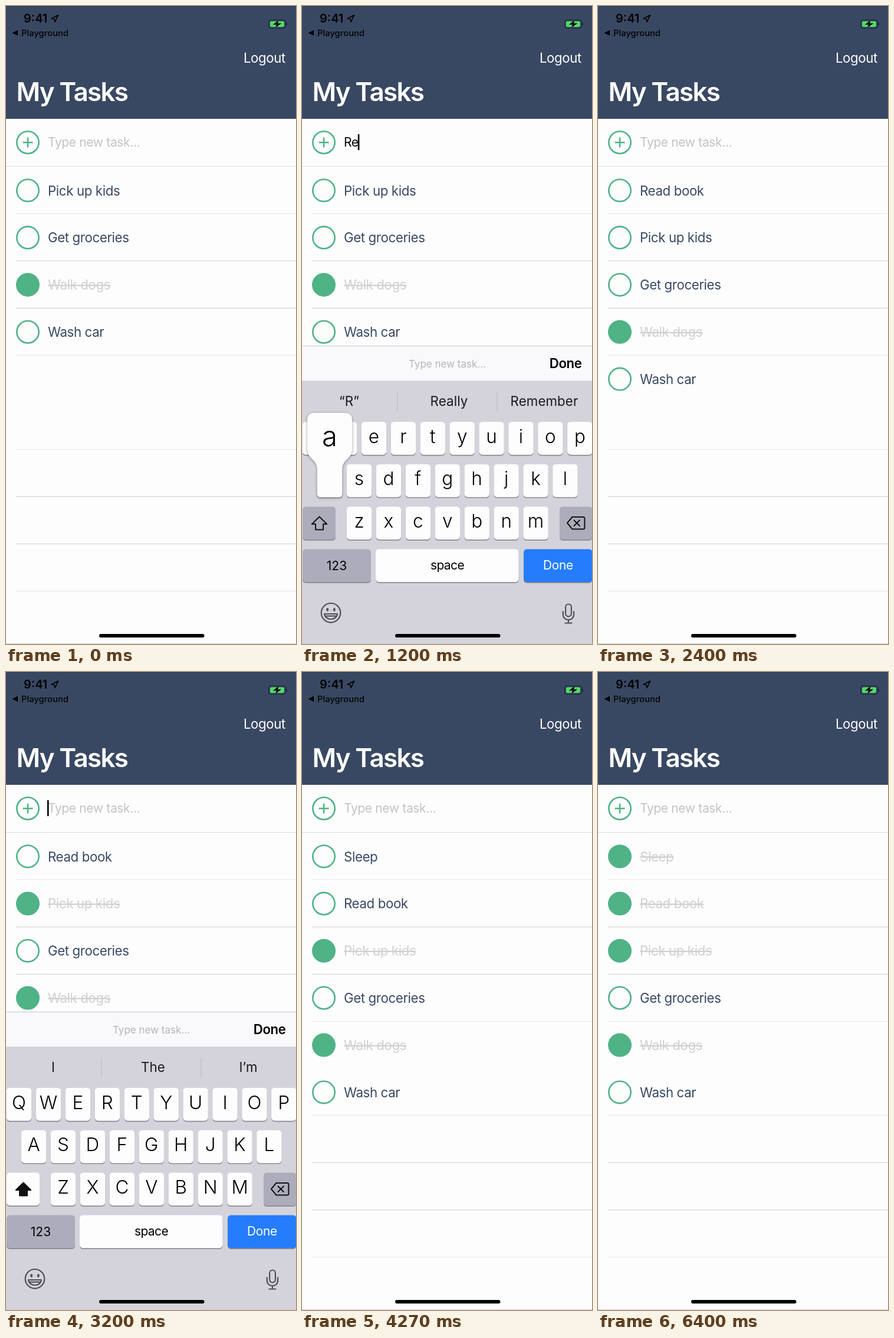
Animation of 492 by 1080 pixels, one loop 6.47 s. Source, as an HTML page:

```html
<!DOCTYPE html>
<html lang="en">
<head>
<meta charset="utf-8">
<title>My Tasks</title>
<style>
  html, body { margin: 0; width: 100%; height: 100%; overflow: hidden; background: #fdfdfd; }
  svg { display: block; width: 492px; height: 1080px; font-family: Inter, Roboto, sans-serif; }
  text { white-space: pre; }
  .body { font-size: 22.3px; letter-spacing: -.4px; }
  .field { font-size: 21px; letter-spacing: -.35px; }
  .hint { font-size: 22.3px; letter-spacing: .1px; text-anchor: middle; fill: #1a1a1c; }
  .mid { text-anchor: middle; }
  .end { text-anchor: end; }
</style>
</head>
<body>
<svg id="stage" viewBox="0 0 492 1080"></svg>
<script>
const LOOP = 6470;
const GREEN = '#4fb386', NAVY = '#394862', PALE = '#d0d0d4';
const ROWS = ['qwertyuiop', 'asdfghjkl', 'zxcvbnm'];
const ROW_X = [22, 47, 97], ROW_Y = [704, 775.7, 847.5];

// key, pressed from, pressed until, text once released
const presses = [
  ['r', 1000, 1065, 'R'], ['e', 1080, 1140, 'Re'], ['a', 1170, 1260, 'Rea'],
  ['d', 1330, 1395, 'Read'], [' ', 1460, 1525, 'Read '], ['b', 1560, 1620, 'Read b'],
  ['o', 1630, 1690, 'Read bo'], ['o', 1700, 1790, 'Read boo'],
  ['k', 1860, 1925, 'Read book'], ['done', 1990, 2060, ''],
  ['s', 3270, 3335, 'S'], ['l', 3400, 3465, 'Sl'], ['e', 3570, 3635, 'Sle'],
  ['e', 3700, 3765, 'Slee'], ['p', 3830, 3895, 'Sleep'], ['done', 3970, 4040, '']
];

// typed text -> three suggestions and whether the middle one is marked
const hints = {
  '': ['I', 'The', 'I’m'],
  'R': ['“R”', 'Really', 'Remember'],
  'Re': ['“R”', 'Really', 'Remember'],
  'Rea': ['“Rea”', 'Read', 'Ready'],
  'Read': ['“Read”', 'Reading', 'Ready'],
  'Read ': ['the', 'it', 'this'],
  'Read b': ['“b”', 'by', 'but'],
  'Read bo': ['“bo”', 'fo', 'book', true],
  'Read boo': ['“boo”', 'book', 'books', true],
  'Read book': ['book', 'books', 'booking'],
  'S': ['“S”', 'So', 'She'],
  'Sl': ['“s', 'I’', 'Ho', true],
  'Sle': ['“Sle”', 'Sleep', 'Sleeping'],
  'Slee': ['“Slee”', 'Sleep', 'Sleeping', true],
  'Sleep': ['Sleep', 'Sleeping', 'Sleepy']
};

// label, added at, ticked at; newest first
const tasks = [
  ['Sleep', 4040, 4870], ['Read book', 2060, 5270], ['Pick up kids', 0, 2670],
  ['Get groceries', 0, LOOP], ['Walk dogs', 0, 0], ['Wash car', 0, LOOP]
];

// keyboard: rise start and end, fall start and end
const shows = [[740, 980, 2065, 2310], [2880, 3120, 4045, 4260]];

const rect = (x, y, w, h, fill, r = 0) =>
  `<rect x="${x}" y="${y}" width="${w}" height="${h}" rx="${r}" fill="${fill}"/>`;
const text = (x, y, str, cls = 'body', attrs = '') =>
  `<text x="${x}" y="${y}" class="${cls}" ${attrs}>${str}</text>`;
const path = (d, attrs) => `<path d="${d}" ${attrs}/>`;
const key = (x, y, w, fill) =>
  rect(x, y + 1.4, w, 56, '#8c8a92', 5.5) + rect(x, y, w, 55.7, fill, 5.5);
const ring = (y, full) =>
  `<circle cx="37" cy="${y}" r="18.7" fill="${full ? GREEN : 'none'}" stroke="${GREEN}" stroke-width="2.6"/>`;

function header() {
  return rect(0, 0, 492, 191, NAVY) + rect(0, 0, 492, 1, '#2c3850') +
    text(30, 27.7, '9:41', '', 'font-size="20" font-weight="600"') +
    path('M77 21.2L88.6 15.3L83 27L82.1 21.8Z',
      'fill="none" stroke="#000" stroke-width="1.6" stroke-linejoin="round"') +
    path('M10.5 45.5L20 40.8V50.2Z', '') +
    text(26, 50.6, 'Playground', '', 'font-size="14.6" font-weight="500" letter-spacing=".1"') +
    `<rect x="446" y="23.8" width="28" height="13.6" rx="4" fill="none" stroke="#17223a" stroke-width="1.3"/>` +
    rect(448, 25.8, 24, 9.6, '#55d964', 2.4) + rect(475.4, 28.2, 1.6, 4.8, '#17223a', .8) +
    path('M462.5 24L453 31.6H459L457 37L467 29.3H461Z', 'stroke="#394862" stroke-width=".6"') +
    text(474, 96.3, 'Logout', 'body end', 'fill="#fff"') +
    text(17.5, 160.5, 'My Tasks', '', 'font-size="44" font-weight="600" letter-spacing="-1.7" fill="#fff"');
}

function lines() {
  const soft = [351, 591, 750, 990], firm = [431, 511, 830, 910];
  return rect(0, 271, 492, 1, '#d9d9db') +
    soft.map(y => rect(17, y, 475, 1, '#e6e6e8')).join('') +
    firm.map(y => rect(17, y, 475, 1, '#cfcfd1')).join('');
}

function list(t) {
  return tasks.filter(k => t >= k[1]).map(([name, , at], i) => {
    const y = 312.2 + 79.85 * i, done = t >= at;
    return ring(y, done) + text(71, y + 8.4, name, 'body',
      done ? `fill="${PALE}" text-decoration="line-through"` : `fill="${NAVY}"`);
  }).join('');
}

function bubble(x, y, label) {
  const c = Math.min(x, 452), l = c - 38, r = c + 38, a = x - 21.2, b = x + 21.2, top = y - 87;
  const d = `M${l + 12} ${top}H${r - 12}Q${r} ${top} ${r} ${top + 12}V${y - 26}` +
    `C${r} ${y - 8} ${b} ${y - 9} ${b} ${y + 9}V${y + 50}Q${b} ${y + 56} ${b - 6} ${y + 56}` +
    `H${a + 6}Q${a} ${y + 56} ${a} ${y + 50}V${y + 9}C${a} ${y - 9} ${l} ${y - 8} ${l} ${y - 26}` +
    `V${top + 12}Q${l} ${top} ${l + 12} ${top}Z`;
  return path(d, 'fill="#fdfdfd" style="filter:drop-shadow(0 1px 2px #0006)"') +
    text(c, y - 31, label, 'mid', 'font-size="47" font-weight="300"');
}

function suggestions(typed) {
  const [a, b, c, marked] = hints[typed];
  const sep = marked ? rect(165, 645, 164, 47.5, '#e7e6eb', 6)
    : rect(161.3, 653, 1, 33, '#b9b8c0') + rect(330.3, 653, 1, 33, '#b9b8c0');
  return sep + text(80, 677.3, a, 'hint') + text(249.5, 677.3, b, 'hint') +
    text(411, 677.3, c, 'hint');
}

function icons(caps) {
  const line = 'fill="none" stroke="#505158" stroke-width="2.2" stroke-linecap="round" stroke-linejoin="round"';
  const black = 'stroke="#111" stroke-width="2" stroke-linejoin="round"';
  return path('M29.5 864.5L42.2 877H36V886.5H23V877H16.8Z', `fill="${caps ? '#111' : 'none'}" ${black}`) +
    path('M458.5 865H477Q479.5 865 479.5 867.5V883Q479.5 885.5 477 885.5H458.5L450 875.2Z', `fill="none" ${black}`) +
    path('M461.5 870.5L471 880M471 870.5L461.5 880', `${black} stroke-linecap="round"`) +
    `<circle cx="49" cy="1027.3" r="16.3" ${line}/>` +
    '<ellipse cx="43.2" cy="1021.8" rx="2" ry="2.9" fill="#505158"/>' +
    '<ellipse cx="54.8" cy="1021.8" rx="2" ry="2.9" fill="#505158"/>' +
    path('M38 1029H60C59 1041 39 1041 38 1029ZM41 1032.6H57', line) +
    `<rect x="447.2" y="1012.5" width="9.8" height="21" rx="4.9" ${line}/>` +
    path('M442.8 1025V1030C442.8 1042 461.2 1042 461.2 1030V1025M452 1039V1044.5M446.5 1044.5H457.5', line);
}

function keyboard(typed, down) {
  const caps = typed === '';
  let pop = '';
  const letters = ROWS.map((row, r) => [...row].map((ch, i) => {
    const x = ROW_X[r] + 49.93 * i, y = ROW_Y[r], label = caps ? ch.toUpperCase() : ch;
    if (ch === down) pop = bubble(x, y, label);
    return key(x - 21.2, y, 42.4, '#fdfdfd') + text(x, y + 35.6, label, 'mid', 'font-size="31.5" font-weight="300"');
  }).join('')).join('');
  const grey = '#adacbb', white = '#fdfdfd';
  return rect(0, 575, 492, 505, '#d4d3db') + rect(0, 575, 492, 59, '#f9f8fb') +
    rect(0, 575, 492, 1, '#c9c9cd') + rect(0, 634, 492, 1, '#dcdbe1') +
    text(246.5, 611.6, 'Type new task...', 'mid', 'font-size="17" fill="#b5b5ba"') +
    text(474.6, 613.2, 'Done', 'body end', 'font-weight="600"') +
    suggestions(typed) + letters +
    key(1, 847.5, 56, caps ? white : grey) + key(437, 847.5, 55.5, grey) +
    key(1, 919.5, 116, grey) + key(125, 919.5, 242.5, down === ' ' ? grey : white) +
    key(376, 919.5, 116.5, down === 'done' ? white : '#257cfd') +
    text(59, 955, '123', 'mid', 'font-size="21"') +
    text(246.5, 954, 'space', 'mid', 'font-size="21" letter-spacing="-.6"') +
    text(434.5, 954, 'Done', 'mid', `font-size="21" letter-spacing="-.4" fill="${down === 'done' ? '#111' : '#fff'}"`) +
    icons(caps) + pop;
}

function lift(t) {
  const show = shows.find(s => t >= s[0] && t < s[3]);
  if (!show) return 0;
  const [a, b, c, d] = show;
  const ease = u => 1 - (1 - Math.min(1, Math.max(0, u))) ** 3;
  return t < c ? ease((t - a) / (b - a)) : 1 - ease((t - c) / (d - c));
}

const stage = document.getElementById('stage');
stage.innerHTML = rect(0, 0, 492, 1080, '#fdfdfd') + header() + lines() +
  ring(231) + path('M28.5 231H45.5M37 222.5V239.5', `stroke="${GREEN}" stroke-width="2.5"`) +
  text(71, 238.3, '', 'field', 'id="input"') + rect(0, 217, 2.6, 27, '#000').replace('<rect', '<rect id="caret"') +
  '<g id="list"></g><g id="board"></g>' +
  rect(158, 1063, 178.5, 6, '#000', 3) + rect(0, 1079, 492, 1, '#d2d0d0');

const [input, caret, listBox, board] = ['input', 'caret', 'list', 'board'].map(id => document.getElementById(id));

const cache = new Map();
function fill(el, html) {
  if (cache.get(el) === html) return;
  cache.set(el, html);
  el.innerHTML = html;
}

function draw(t) {
  let typed = '', down = null;
  for (const [ch, from, to, result] of presses) {
    if (t >= to) typed = result;
    else if (t >= from) down = ch;
  }
  const focused = shows.some(s => t >= s[0] && t < s[2]);
  fill(input, typed || 'Type new task...');
  input.setAttribute('fill', typed ? '#000' : '#c3c3c7');
  caret.setAttribute('x', 70 + (typed ? input.getComputedTextLength() : 0));
  caret.setAttribute('visibility', focused ? 'visible' : 'hidden');
  fill(listBox, list(t));
  const up = lift(t);
  board.setAttribute('visibility', up ? 'visible' : 'hidden');
  if (up) fill(board, keyboard(typed, down));
  board.setAttribute('transform', `translate(0 ${505 * (1 - up)})`);
}

function tick() {
  draw(performance.now() % LOOP);
  requestAnimationFrame(tick);
}
tick();
</script>
</body>
</html>
```
